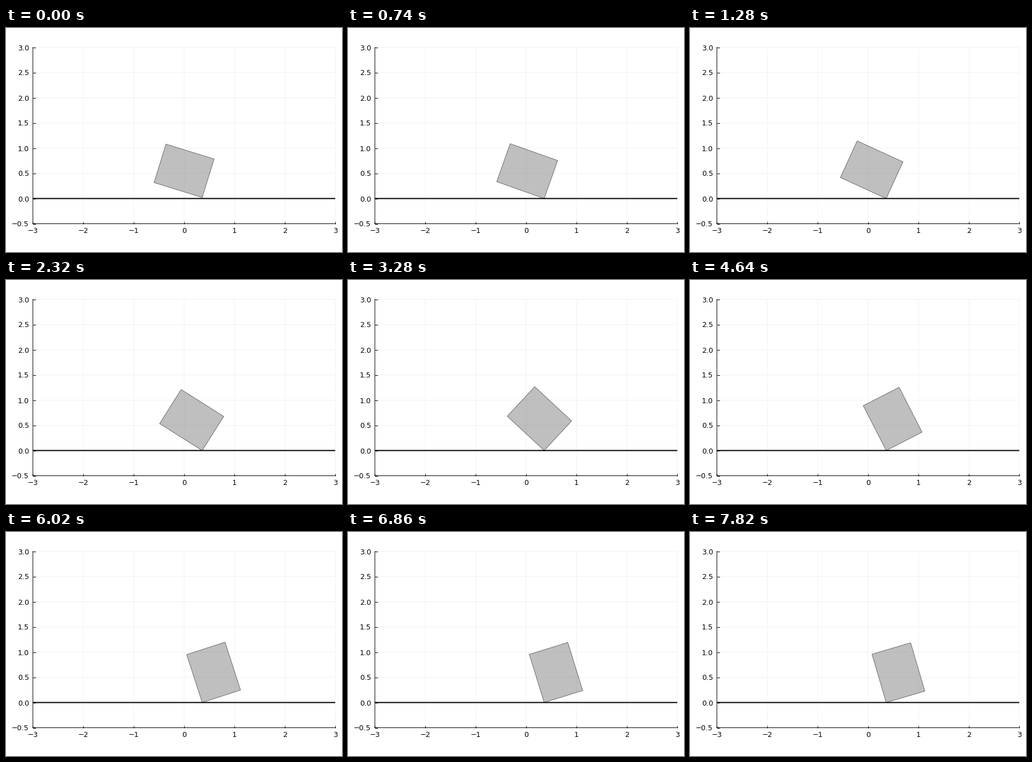
Write a matplotlib script that moves like this. It is 600 px wide and 400 px high and loops after 8000 ms.

```python
import numpy as np
import matplotlib.pyplot as plt
from matplotlib.animation import FuncAnimation
from matplotlib.patches import Polygon

W, H, DPI = 600, 400, 100
PX = 72 / DPI            # one pixel in points
TICK = 20                # ms per animation frame
LOOP = 8000

LONG, SHORT = 1.0, 0.8   # box sides
PIVOT_X = 0.3594
DROP = 0.02              # height of the corner before it lands

# Tilt in degrees: landing, slow push, tipping over, then settling
KEYS = [(0, 17.2), (320, 16.5), (1280, 24.6), (2320, 32.3),
        (3280, 42.9), (4640, 62.9), (4860, 70.5), (6020, 72.05), (7820, 73.6)]


def beats(start, stop, k):
    """Pose times: long and short holds mixed evenly, 7 short ones in 16."""
    while start < stop:
        yield start
        start += 120 if 7 * k % 16 >= 9 else 200
        k += 1


starts = np.array([0, 100, 200, 320, *range(520, 1200, 80),
                   *beats(1280, 4860, 0), *beats(4860, LOOP, 17)])
tilts = np.radians(np.interp(starts, *zip(*KEYS)))


def corners(tilt, height):
    """Corners of the box standing on its lowest one."""
    pivot = np.array([PIVOT_X, height])
    along = LONG * np.array([-np.cos(tilt), np.sin(tilt)])
    across = SHORT * np.array([np.sin(tilt), np.cos(tilt)])
    return np.array([pivot, pivot + along, pivot + along + across, pivot + across])


plt.rcParams["font.family"] = "DejaVu Sans"
plt.rcParams["path.snap"] = False
fig = plt.figure(figsize=(W / DPI, H / DPI), dpi=DPI, facecolor="white")
ax = fig.add_axes([48 / W, 50.5 / H, 540 / W, 315 / H])
ax.set(xlim=(-3, 3), ylim=(-0.5, 3), xticks=range(-3, 4),
       yticks=np.arange(-0.5, 3.1, 0.5))
ax.set_axisbelow(True)
ax.grid(color="black", alpha=0.1, linewidth=0.5 * PX, clip_on=False)
ax.spines[["top", "right"]].set_visible(False)
ax.spines[["left", "bottom"]].set_linewidth(PX)
ax.tick_params(direction="in", length=4.5 * PX, width=PX, labelsize=12.8 * PX)
ax.tick_params(axis="x", pad=6 * PX)
ax.tick_params(axis="y", pad=7 * PX)

box = Polygon(corners(tilts[0], DROP), closed=True, facecolor=(0.5, 0.5, 0.5, 0.5),
              edgecolor=(0, 0, 0, 0.5), linewidth=PX, joinstyle="miter", zorder=2)
ax.add_patch(box)
ax.plot([-3, 3], [0, 0], color="black", linewidth=2 * PX,
        solid_capstyle="butt", zorder=3)


def update(frame):
    pose = np.searchsorted(starts, frame * TICK, side="right") - 1
    box.set_xy(corners(tilts[pose], DROP if pose == 0 else 0))
    return [box]


anim = FuncAnimation(fig, update, frames=LOOP // TICK, interval=TICK,
                     repeat=True, repeat_delay=0, blit=False)
plt.show()
```
